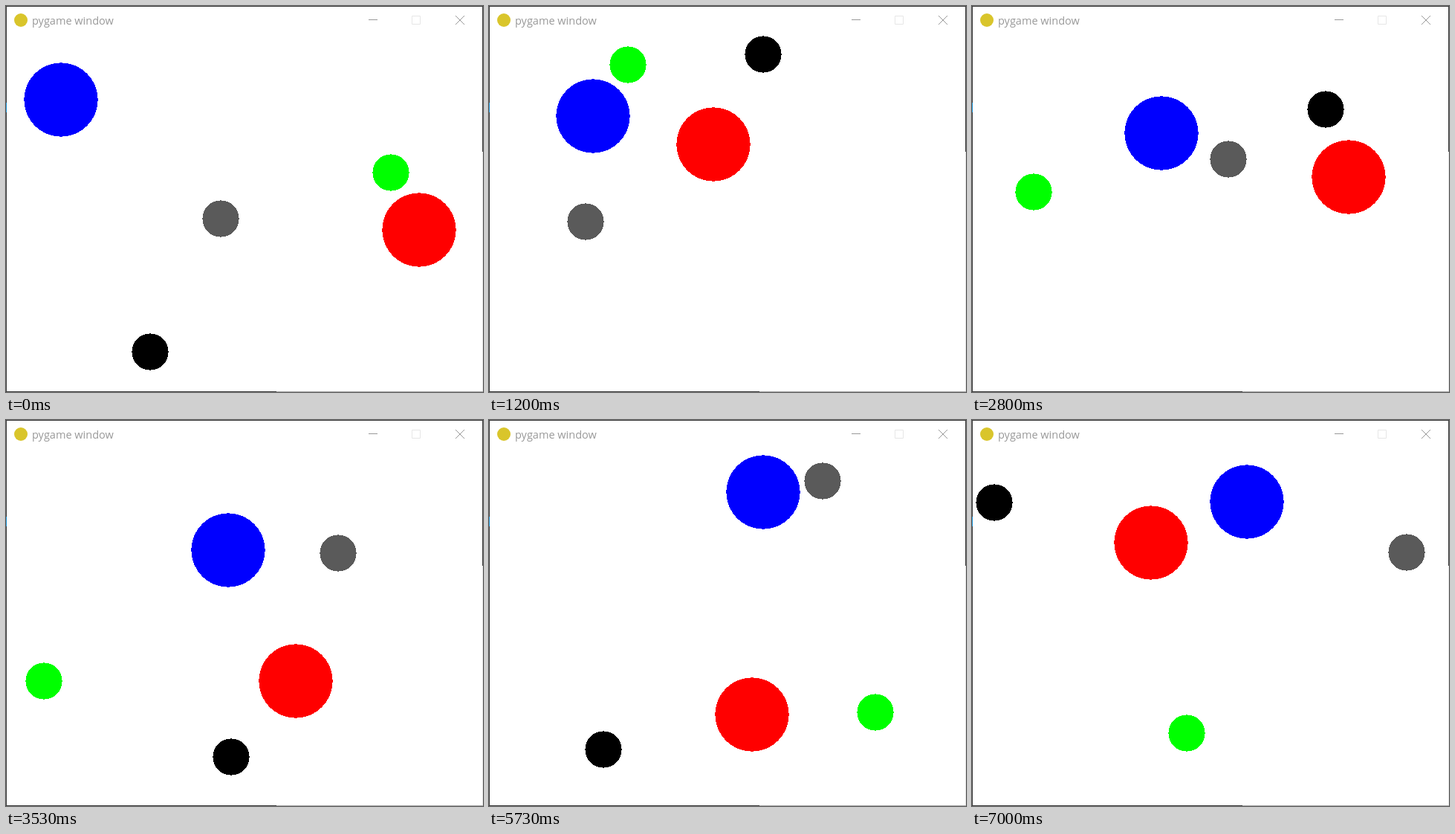
Animation, 642 px wide and 519 px high, one loop 7.07 s. Source, as an HTML page:

```html
<!DOCTYPE html>
<html lang="en">
<head>
<meta charset="utf-8">
<title>pygame window</title>
<style>
  html, body { margin: 0; width: 100%; height: 100%; overflow: hidden; background: #fff; }
  svg { display: block; }
  text { font: 14.5px "Open Sans", "Noto Sans", sans-serif; fill: #999; }
</style>
</head>
<body>
<svg width="642" height="519" viewBox="0 0 642 519">
  <rect width="642" height="519" fill="#fff"/>
  <g id="balls" shape-rendering="crispEdges"></g>
  <circle cx="20" cy="19" r="9" fill="#d9c52b"/>
  <text x="35" y="25">pygame window</text>
  <g fill="none" stroke="#999">
    <path d="M488 18.5h12"/>
    <path d="M546.5 13.5h11v11h-11z" stroke="#e6e6e6"/>
    <path d="M605 13l12 12M617 13l-12 12"/>
  </g>
  <g fill="none" stroke="#3c3c3c" shape-rendering="crispEdges">
    <path d="M364 518.5H.5V.5h641V196"/>
    <path d="M364 518.5h278" stroke="#aaa"/>
    <path d="M641.5 196v322" stroke="#e4e4e4"/>
    <path d="M.5 130v13" stroke="#1a8fd0"/>
  </g>
</svg>
<script>
const LOOP = 7070, STEP = 1000 / 15, LAST = 105;
const ROOM = { left: 1, right: 641, top: 38, bottom: 518 };

// A ball flies straight from one hit [step, x, y] to the next.
// A hit beyond a wall is aimed at as if the wall were a mirror.
const balls = [
  { color: '#0000ff', r: 50, hits: [
    [0, 74, 126], [18, -38, 148], [31, 211, 166], [53, 299, 175],
    [67, 322, 144], [87, 371, 94], [105, 370, 66]] },
  { color: '#ff0000', r: 50, hits: [
    [0, 556, 301], [18, 880, 186], [31, 558, 67], [53, 792, 351],
    [67, 398, 327], [88.6, 348, 569], [105, 241, 165]] },
  { color: '#00ff00', r: 25, hits: [
    [0, 518, 224], [33.34, -95, -45], [71, -133, 515], [88.6, 803, 380],
    [105, 943, 565]] },
  { color: '#5a5a5a', r: 25, hits: [
    [0, 289, 286], [18, -78, -164], [31, 243, 754], [53, 447, 179],
    [67, 578, 88], [87, 794, 42], [105, 647, 178]] },
  { color: '#000000', r: 25, hits: [
    [0, 194, 465], [18, 369, 921], [31, 584, -256], [53, 929, 1313],
    [67, 156, 1100], [86, -102, 543], [105, 30, 875]] }
];

const group = document.getElementById('balls');
for (const ball of balls) {
  ball.node = document.createElementNS('http://www.w3.org/2000/svg', 'circle');
  ball.node.setAttribute('r', ball.r - 0.4);
  ball.node.setAttribute('fill', ball.color);
  group.append(ball.node);
}

// Reflects a coordinate back and forth between two walls.
function bounce(value, low, high) {
  const span = high - low, period = 2 * span;
  const phase = ((value - low) % period + period) % period;
  return low + span - Math.abs(span - phase);
}

function positionAt({ hits, r }, step) {
  const bounceX = x => bounce(x, ROOM.left + r, ROOM.right - r);
  const bounceY = y => bounce(y, ROOM.top + r, ROOM.bottom - r);
  const i = Math.max(1, hits.findIndex(hit => hit[0] >= step));
  const [t0, x0, y0] = hits[i - 1], [t1, x1, y1] = hits[i];
  const u = (step - t0) / (t1 - t0);
  const move = (from, to) => from + (to - from) * u;
  return [bounceX(move(bounceX(x0), x1)), bounceY(move(bounceY(y0), y1))].map(Math.round);
}

function draw(ms) {
  const step = Math.min(LAST, Math.floor((ms % LOOP + 3.4) / STEP));
  for (const ball of balls) {
    const [x, y] = positionAt(ball, step);
    ball.node.setAttribute('cx', x);
    ball.node.setAttribute('cy', y);
  }
}

const start = performance.now();
function tick() {
  draw(performance.now() - start);
  requestAnimationFrame(tick);
}
tick();
</script>
</body>
</html>
```
